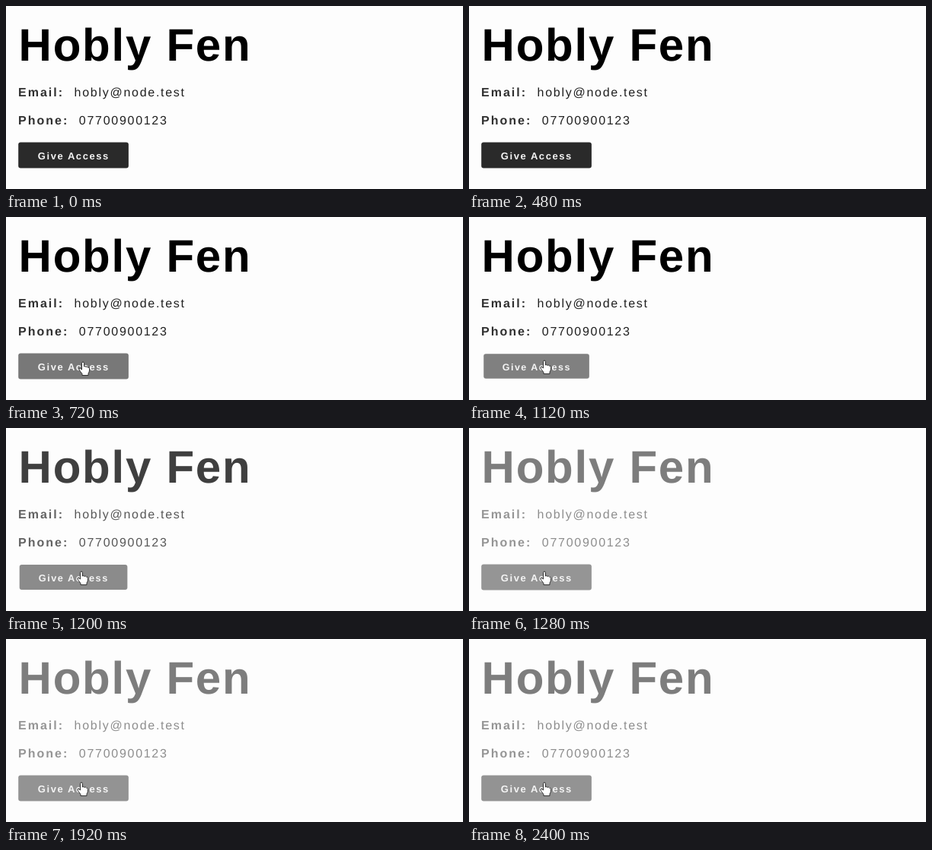
An HTML page for the animation above (2.48 s loop, 600 by 241 pixels).

```html
<!DOCTYPE html>
<html lang="en">
<head>
<meta charset="utf-8">
<title>Give access</title>
<style>
  html, body { margin: 0; width: 100%; height: 100%; overflow: hidden; background: #fdfdfd; }
  svg { display: block; font: 16px "Liberation Sans", Arial, sans-serif; text-rendering: geometricPrecision; }
  .name { font-size: 60px; font-weight: bold; letter-spacing: 1.75px; }
  .label { font-weight: bold; letter-spacing: 2px; fill: #303030; }
  .value { letter-spacing: 1.72px; fill: #202020; }
  .action { font-size: 13px; font-weight: bold; letter-spacing: 1.56px; fill: #f4f4f4; }
</style>
</head>
<body>
<svg width="600" height="241" viewBox="0 0 600 241">
  <g id="info">
    <text class="name" x="16.6" y="72.4">Hobly Fen</text>
    <text class="label" x="16" y="119">Email:</text>
    <text class="value" x="89.6" y="119">hobly@node.test</text>
    <text class="label" x="16" y="156.3">Phone:</text>
    <text class="value" x="95.8" y="156.3">07700900123</text>
  </g>
  <g id="button">
    <rect id="face" x="16.2" y="179.6" width="144.7" height="33.8" rx="3"/>
    <text class="action" x="41.8" y="201.8">Give Access</text>
  </g>
  <path id="hand" fill="#fff" stroke="#222" stroke-width=".9" stroke-linejoin="round"
    d="M-2 1.5Q-2 0-.5 0Q1 0 1 1.5V6Q2.3 5 3.3 6.3Q5 5.4 5.8 7Q8 6.5 8 8.5V11Q8 13 6.5 15V17.5H-1.5V15.5Q-4 12.5-5.5 10Q-6 8-4 8.4L-2 10Z"/>
</svg>
<script>
const LOOP = 2480, STEP = 80;
const [info, button, face, hand] = ['info', 'button', 'face', 'hand'].map(id => document.getElementById(id));

// Each track is a list of [time, value] points joined by straight lines.
const tracks = {
  x: [[560, 105], [640, 102.5], [720, 101.5], [960, 99.5]],
  y: [[560, 204], [640, 195], [720, 191], [960, 189]],
  gray: [[560, 42], [640, 84], [720, 120], [880, 128], [1120, 128], [1280, 149], [1520, 147]],
  scale: [[960, 1], [1120, 0.958], [1280, 1]],
  opacity: [[1120, 1], [1280, 0.5]]
};

function at(points, t) {
  const i = points.findIndex(p => p[0] > t);
  if (i === 0) return points[0][1];
  if (i < 0) return points[points.length - 1][1];
  const [t0, a] = points[i - 1], [t1, b] = points[i];
  return a + (b - a) * (t - t0) / (t1 - t0);
}

function draw(now) {
  const t = Math.floor(now % LOOP / STEP) * STEP;
  const v = name => at(tracks[name], t);
  const gray = Math.round(v('gray'));
  info.setAttribute('opacity', v('opacity'));
  face.setAttribute('fill', `rgb(${gray},${gray},${gray})`);
  button.setAttribute('transform', `translate(88.5 196.5) scale(${v('scale')}) translate(-88.5 -196.5)`);
  hand.setAttribute('visibility', t < 560 ? 'hidden' : 'visible');
  hand.setAttribute('transform', `translate(${v('x')} ${v('y')})`);
}

const start = performance.now();
function frame() {
  draw(performance.now() - start);
  requestAnimationFrame(frame);
}
frame();
</script>
</body>
</html>
```
